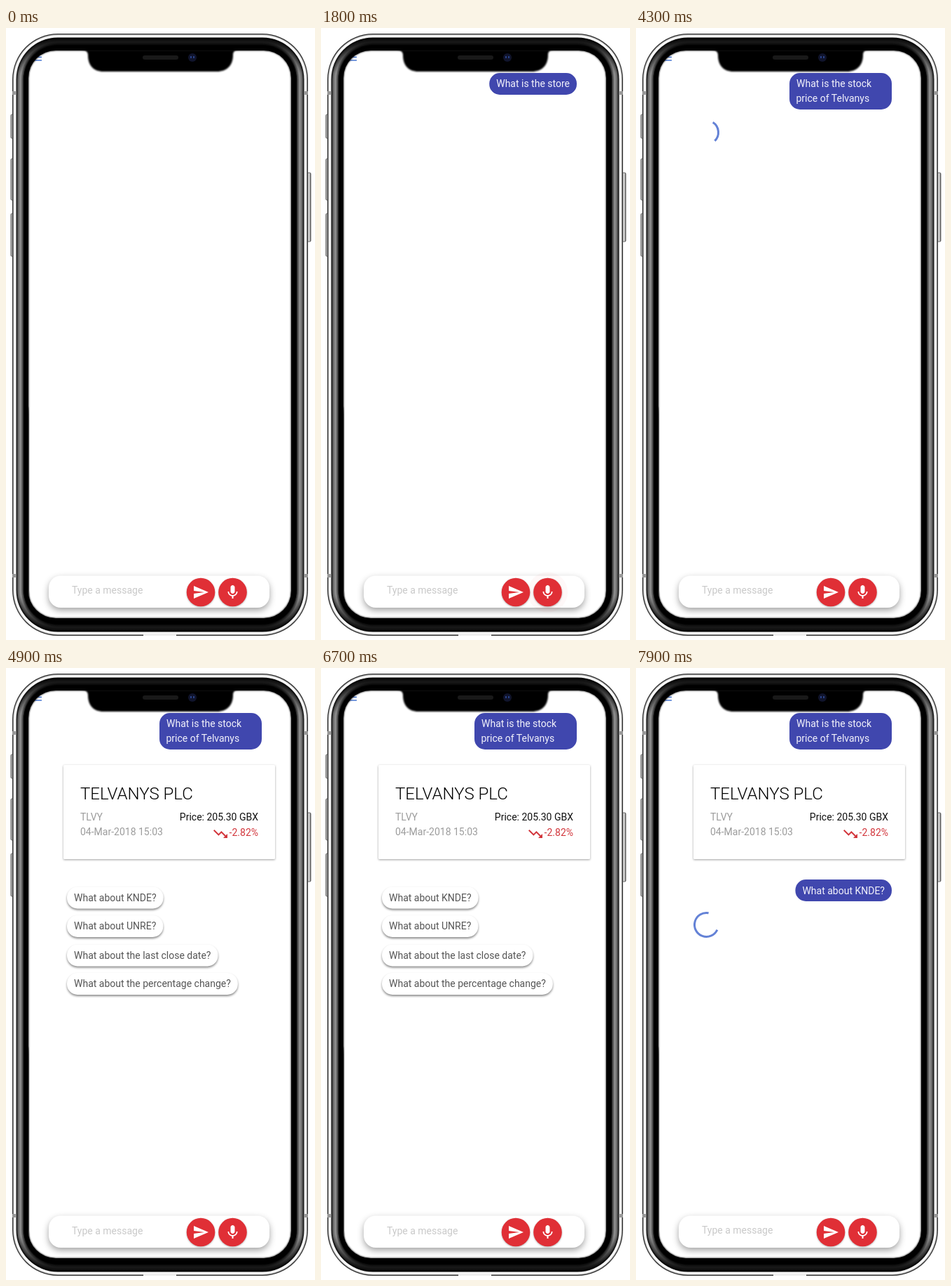
An HTML page that plays this animation: 441x871 px, repeating every 8 s.

```html
<!DOCTYPE html>
<html lang="en">
<head>
<meta charset="utf-8">
<title>Voice assistant</title>
<style>
  html, body { margin: 0; width: 100%; height: 100%; overflow: hidden; background: #fff; }
  svg { display: block; width: 441px; height: 871px; }
  text { font: 14px Roboto, sans-serif; white-space: pre; }
  .bubble rect { fill: #4047ae; }
  .bubble text { fill: #f2f2fb; }
  .card { fill: #fff; filter: drop-shadow(0 1.5px 1.5px rgba(0, 0, 0, .38)); }
  .chip rect { fill: #fff; filter: drop-shadow(0 2px 1.8px rgba(0, 0, 0, .45)); }
  .chip text { fill: #555; }
  .bar { fill: #fff; filter: drop-shadow(0 4px 5px rgba(0, 0, 0, .36)); }
  .button { fill: #e02f36; filter: drop-shadow(0 1px 1px rgba(0, 0, 0, .3)); }
  .spinner { fill: none; stroke: #6482d6; stroke-width: 3; }
</style>
</head>
<body>
<svg viewBox="0 0 441 871">
  <defs>
    <linearGradient id="shade" x2="0" y2="1">
      <stop offset="0" stop-opacity=".9"/>
      <stop offset=".01" stop-opacity=".8"/>
      <stop offset=".06" stop-opacity="0"/>
      <stop offset=".94" stop-opacity="0"/>
      <stop offset=".99" stop-opacity=".8"/>
      <stop offset="1" stop-opacity=".9"/>
    </linearGradient>
    <linearGradient id="key">
      <stop offset="0" stop-color="#777"/>
      <stop offset=".45" stop-color="#eee"/>
      <stop offset="1" stop-color="#666"/>
    </linearGradient>
    <filter id="soft" x="-5%" y="-5%" width="110%" height="110%"><feGaussianBlur stdDeviation=".8"/></filter>
    <clipPath id="screen"><rect x="32" y="32" width="375" height="808" rx="39"/></clipPath>
  </defs>

  <g id="body"></g>

  <g clip-path="url(#screen)">
    <rect x="32" y="32" width="375" height="808" fill="#fff"/>
    <path d="M32 538Q33 542 33 556V800Q33 820 41 834L32 840Z" fill="#888"/>
    <path d="M44 41.5H51M41 46H51" stroke="#4a78d2" stroke-width="1.7"/>

    <g id="ask" class="bubble">
      <rect y="64" height="31" rx="15"/>
      <text y="84"></text>
      <text x="228.5" y="105"></text>
    </g>

    <g id="result">
      <rect class="card" x="82" y="138" width="302" height="134" rx="1.5"/>
      <text x="106" y="187" style="font-size:24px;font-weight:300" fill="#000">TELVANYS PLC</text>
      <text x="106" y="217" fill="#9c9c9c">TLVY</text>
      <text x="106" y="238" fill="#9c9c9c">04-Mar-2018 15:03</text>
      <text x="360" y="217" text-anchor="end" fill="#111">Price: 205.30 GBX</text>
      <text x="360" y="239" text-anchor="end" fill="#d2353b">-2.82%</text>
      <path transform="translate(294 224)" fill="#d2353b" d="M16 18l2.29-2.29-4.88-4.88-4 4L2 7.41 3.41 6l6 6 4-4 6.3 6.29L22 12v6z"/>
    </g>
    <g id="chips"></g>

    <g id="next" class="bubble">
      <rect y="301" height="31" rx="15"/>
      <text y="322">What about KNDE?</text>
    </g>
    <path id="spinner" class="spinner"/>

    <rect class="bar" x="61" y="779.5" width="315" height="45.5" rx="17"/>
    <text id="hint" x="94" fill="#c9c9c9">Type a message</text>
    <circle id="pulse" cx="323.5" cy="803" fill="#e02f36"/>
    <circle class="button" cx="278" cy="803" r="20.3"/>
    <circle class="button" cx="323.5" cy="803" r="20.3"/>
    <path transform="translate(266 791)" fill="#fff" d="M2 21L23 12 2 3V10l15 2-15 2z"/>
    <path transform="translate(311.5 791)" fill="#fff" d="M12 14c1.66 0 3-1.34 3-3V5c0-1.66-1.34-3-3-3S9 3.34 9 5v6c0 1.66 1.34 3 3 3zm5.3-3c0 3-2.54 5.1-5.3 5.1S6.7 14 6.7 11H5c0 3.41 2.72 6.23 6 6.72V21h2v-3.28c3.28-.48 6-3.3 6-6.72z"/>
  </g>

  <rect x="31.5" y="31.5" width="376" height="809" rx="39.5" fill="none" stroke="#000" stroke-width="1.6" filter="url(#soft)"/>
  <path d="M108 31H332C326 31 324 34 324 39C324 53 315 62 301 62H139C125 62 117 53 117 39C117 34 114 31 108 31Z" filter="url(#soft)"/>
  <rect x="195" y="39" width="51" height="6" rx="3" fill="#191919"/>
  <circle cx="266" cy="42" r="6" fill="#10142c"/>
  <path d="M264 40V43M268 40V43" stroke="#3454a8" stroke-width="1.4"/>
</svg>

<script>
const LOOP = 8000;
const RIGHT = 365;
const $ = id => document.getElementById(id);

function add(parent, tag, attrs, text) {
  const el = document.createElementNS('http://www.w3.org/2000/svg', tag);
  set(el, attrs);
  if (text) el.textContent = text;
  parent.append(el);
  return el;
}

function set(el, attrs) {
  for (const k in attrs) el.setAttribute(k, attrs[k]);
}

function show(el, on) {
  el.style.display = on ? '' : 'none';
}

const clamp = v => Math.max(0, Math.min(1, v));

// Phone body: side keys first, then nested shells from the rim inwards
function buildBody() {
  const body = $('body');
  const keys = [[7, 123, 34], [7, 186, 59], [7, 264, 61], [430, 206, 98]];
  for (const [x, y, height] of keys)
    add(body, 'rect', { x, y, width: 5, height, rx: 1.5, fill: 'url(#key)', stroke: '#333', 'stroke-width': .7 });

  const shell = (d, fill) =>
    add(body, 'rect', { x: 9 + d, y: 8 + d, width: 422 - 2 * d, height: 857 - 2 * d, rx: 65 - d, fill });
  const metal = [[0, '#333'], [1.3, '#b5b5b5'], [2.2, '#f7f7f7'], [5.5, '#1c1c1c'], [7.2, '#555'], [8.7, '#777'], [10.5, '#8c8c8c'], [13, '#606060'], [14.8, '#2c2c2c']];
  for (const [d, fill] of metal) shell(d, fill);
  shell(6, 'url(#shade)');
  shell(16.2, '#000');

  for (const y of [90, 777])
    for (const x of [9, 425.5])
      add(body, 'rect', { x, y, width: 5.5, height: 5, fill: '#999' });
  add(body, 'rect', { x: 196, y: 862, width: 47, height: 3, fill: '#eee' });
}

const chips = [];
function buildChips() {
  const rows = [[312, 'KNDE'], [352.5, 'UNRE'], [394, 'the last close date'], [434.5, 'the percentage change']];
  for (const [y, topic] of rows) {
    const g = add($('chips'), 'g', { class: 'chip' });
    const box = add(g, 'rect', { x: 87, y: y - .5, height: 31, rx: 15 });
    const label = add(g, 'text', { x: 97, y: y + 19.5 }, `What about ${topic}?`);
    chips.push([box, label]);
  }
}

// Speech recognition guesses: time, first line, second line
const heard = [
  [1100, 'What', ''],
  [1300, 'What is', ''],
  [1500, 'What is the', ''],
  [1700, 'What is the store', ''],
  [2100, 'What is the stock', ''],
  [2400, 'What is the stock', 'price'],
  [2700, 'What is the stock', 'price of'],
  [2900, 'What is the stock', 'price of Fentolby'],
  [3400, 'What is the stock', 'price of Telvanys']
];

function fitBubble(g, wide) {
  const [box, label] = g.children;
  const width = wide ? 146 : label.getComputedTextLength() + 20;
  set(box, { x: RIGHT - width, width });
  set(label, { x: RIGHT - width + 10 });
}

function drawAsk(t) {
  const now = heard.filter(h => h[0] <= t).pop();
  const ask = $('ask');
  show(ask, now);
  if (!now) return;
  const [box, top, low] = ask.children;
  top.textContent = now[1];
  low.textContent = now[2];
  set(box, { height: now[2] ? 52 : 31 });
  fitBubble(ask, now[2]);
}

// Arc breathes between 5 and 270 degrees while its middle turns
function drawSpinner(t) {
  const first = t >= 3800 && t < 4600;
  const second = t >= 7300;
  const el = $('spinner');
  show(el, first || second);
  if (!first && !second) return;
  const [at, phase, mid, cy] = first ? [4300, .207, -6, 148.5] : [7900, .424, 152.5, 365.5];
  const p = phase + (t - at) / 1333;
  const half = (5 + 132.5 * (1 - Math.cos(2 * Math.PI * p))) / 2;
  const turn = mid + (t - at) * 360 / 1568;
  const point = deg => {
    const a = deg * Math.PI / 180;
    return `${100.5 + 17 * Math.cos(a)} ${cy + 17 * Math.sin(a)}`;
  };
  set(el, { d: `M${point(turn - half)}A17 17 0 ${half > 90 ? 1 : 0} 1 ${point(turn + half)}` });
}

function draw(t) {
  drawAsk(t);
  drawSpinner(t);

  const shown = clamp((t - 4550) / 200);
  $('result').style.opacity = shown;
  $('chips').style.opacity = t < 7200 ? shown : 0;
  for (const [box, label] of chips) set(box, { width: label.getComputedTextLength() + 20 });

  show($('next'), t >= 7200);
  if (t >= 7200) fitBubble($('next'));

  const p = t % 2000 / 2000;
  set($('pulse'), { r: 20 + 9.5 * p, opacity: t < 3000 ? .3 * (1 - p) : 0 });
  set($('hint'), { y: t >= 4600 && t < 7200 ? 806 : 805.3 });
}

buildBody();
buildChips();
const start = performance.now();
function tick() {
  draw((performance.now() - start) % LOOP);
  requestAnimationFrame(tick);
}
tick();
</script>
</body>
</html>
```
